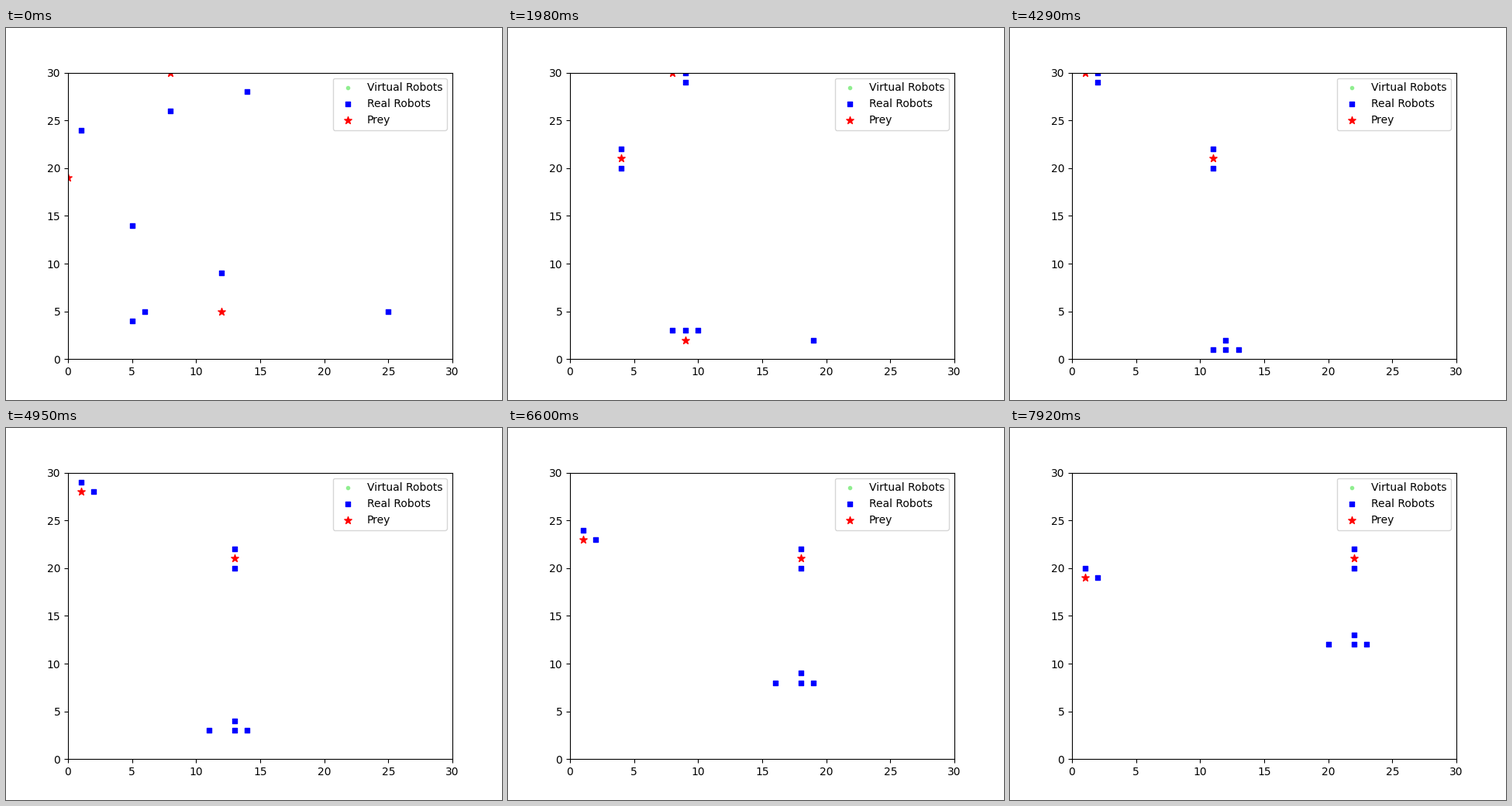
A matplotlib script for the animation above (8 s loop, 640 by 480 pixels).

```python
import matplotlib.pyplot as plt
from matplotlib.animation import FuncAnimation

SIZE = 30
STEP_MS = 330
TICK_MS = 40
LOOP_MS = 8000

# Prey: start cell, then legs of (dx, dy, steps)
PREY = [
    ((8, 30), [(1, 0, 3), (-1, 0, 10), (0, -1, 11)]),
    ((0, 19), [(0, 1, 2), (1, 0, 22)]),
    ((12, 5), [(-1, 0, 3), (0, -1, 5), (1, 0, 4)]),
]
# Robots take their turns in this order
ROBOTS = [(8, 26), (14, 28), (1, 24), (5, 14),
          (6, 5), (12, 9), (25, 5), (5, 4)]


def walk(start, legs):
    x, y = start
    path = [start]
    for dx, dy, count in legs:
        for _ in range(count):
            x, y = x + dx, y + dy
            path.append((x, y))
    return path


def dist2(a, b):
    return (a[0] - b[0]) ** 2 + (a[1] - b[1]) ** 2


def chase(pos, prey, taken):
    """Step to the free neighbouring cell closest to the nearest prey."""
    goal = min(prey, key=lambda p: dist2(p, pos))
    if dist2(pos, goal) <= 1:
        return pos
    best = pos
    for dx in (-1, 0, 1):
        for dy in (-1, 0, 1):
            cell = pos[0] + dx, pos[1] + dy
            inside = 0 <= cell[0] <= SIZE and 0 <= cell[1] <= SIZE
            if inside and cell not in taken and dist2(cell, goal) <= dist2(best, goal):
                best = cell
    return best


def simulate(steps):
    paths = [walk(*p) for p in PREY]
    robots = list(ROBOTS)
    prey = [p[0] for p in paths]
    states = [(list(robots), prey)]
    for k in range(1, steps):
        caught = [p[-1] for p in paths if len(p) == k]
        prey = [p[k] for p in paths if k < len(p)]
        for i, pos in enumerate(robots):
            # a helper just behind the ring around a caught prey rests one turn
            if any(dist2(pos, c) == 2 and pos[0] < c[0] for c in caught):
                continue
            if any(dist2(pos, c) <= 2 for c in caught) or prey:
                others = robots[:i] + robots[i + 1:]
                robots[i] = chase(pos, prey, set(others) | set(prey))
        states.append((list(robots), prey))
    return states


states = simulate(LOOP_MS // STEP_MS + 1)

fig, ax = plt.subplots(figsize=(6.4, 4.8), dpi=100)
ax.set_xlim(0, SIZE)
ax.set_ylim(0, SIZE)
ax.scatter([], [], marker=".", s=36, color="lightgreen", label="Virtual Robots")
robot_dots = ax.scatter([], [], marker="s", s=20, color="blue", label="Real Robots")
prey_dots = ax.scatter([], [], marker="*", s=50, color="red", label="Prey")
ax.legend(loc="upper right")


def update(i):
    step = (i * TICK_MS + TICK_MS - 10) // STEP_MS
    robots, prey = states[min(step, len(states) - 1)]
    robot_dots.set_offsets(robots)
    prey_dots.set_offsets(prey)
    return robot_dots, prey_dots


anim = FuncAnimation(fig, update, frames=LOOP_MS // TICK_MS, interval=TICK_MS,
                     repeat=True, repeat_delay=0)
plt.show()
```
